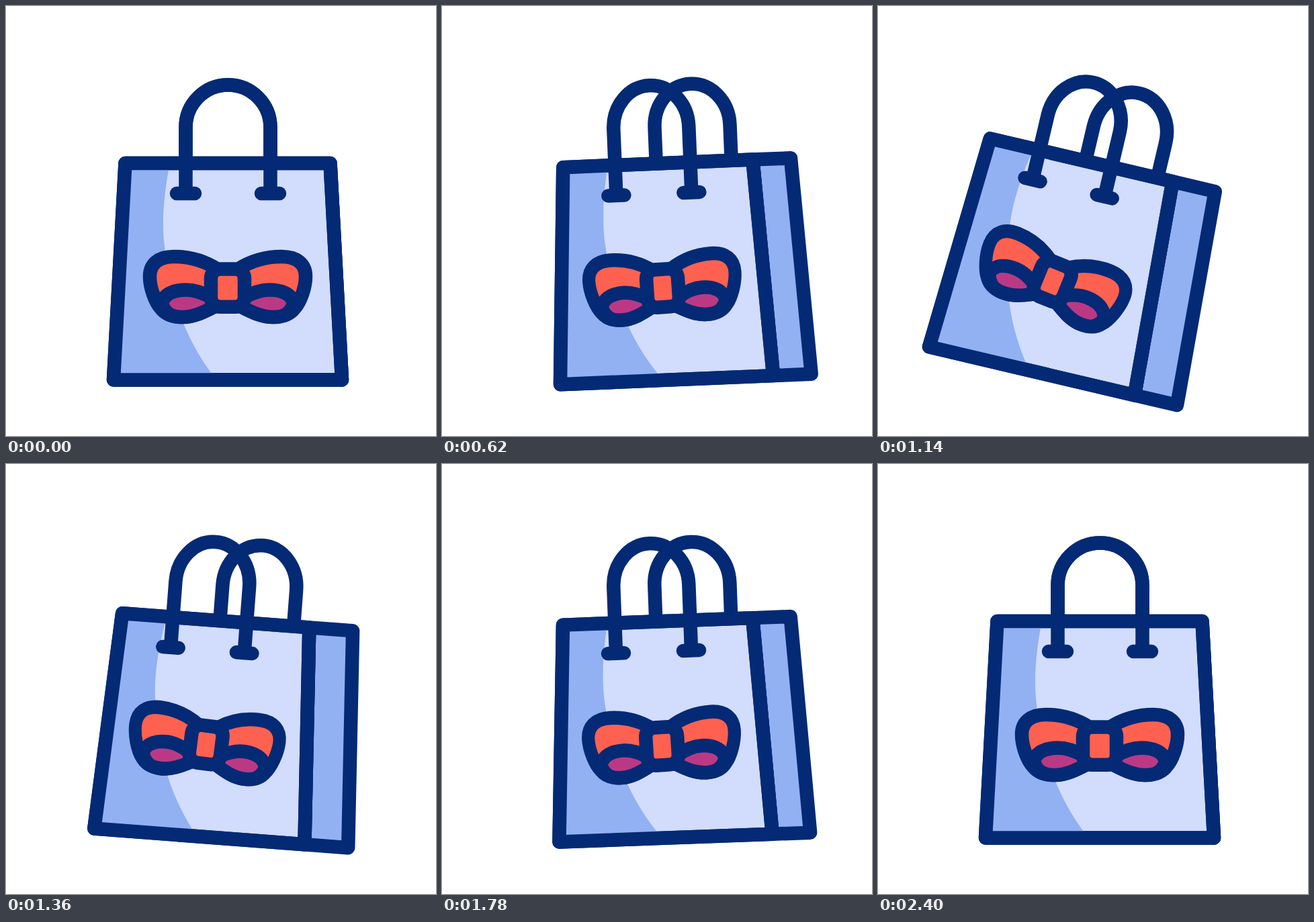
Animation of 640 by 640 pixels, one loop 2.42 s. Source, as an HTML page:

```html
<!DOCTYPE html>
<html lang="en">
<head>
<meta charset="utf-8">
<title>Swinging gift bag</title>
<style>
  html, body { margin: 0; width: 100%; height: 100%; overflow: hidden; background: #fff; }
  svg { display: block; width: 100%; height: 100%; }
  .line { fill: none; stroke: #042a75; stroke-width: 20.5; stroke-linecap: round; stroke-linejoin: round; }
  .line * { vector-effect: non-scaling-stroke; }
  .light { fill: #d2dcfd; }
  .shade { fill: #92b1f3; }
  .red { fill: #ff6150; }
  .purple { fill: #bb3984; }
</style>
</head>
<body>
<svg viewBox="0 0 640 640">
  <defs>
    <!-- One bow wing, relative to the knot centre -->
    <g id="wing">
      <path class="red" d="M-14-27C-34-40-58-46.500-80-46.500C-104-46.500-116-35-116-17C-116 0-108 21-100 30C-92 41-80 43.500-68 43.500C-50 43.500-35 36-18 27"/>
      <path class="purple" d="M-98 24C-96 8-78 3-62 3C-46 3-34 9-24 15L-18 27C-35 36-50 43.500-68 43.500C-80 43.500-92 41-98 24Z"/>
    </g>
  </defs>
  <g id="bag" class="line">
    <path id="backHandle" d="M-63 234V180.500A63 63 0 0 1 63 180.500V234"/>
    <path id="side" class="shade"/>
    <path id="front" class="light"/>
    <path class="shade" stroke="none" d="M177 234H244C236 272 231 320 236 357C243 430 268 500 313 556H160Z"/>
    <path id="frontEdge"/>
    <path id="frontHandle" d="M-76.500 279H-49.500M-63 279V180.500A63 63 0 0 1 63 180.500V279M49.500 279H76.500"/>
    <g id="bow">
      <use href="#wing"/>
      <use href="#wing" transform="scale(-1 1)"/>
      <rect class="red" x="-25" y="-28" width="50" height="56.300" rx="14"/>
    </g>
  </g>
</svg>
<script>
  const LOOP = 2420, STEP = 400;
  const SWING = [0, 1, -1, 1, -1, 1, 0, 0];
  const el = id => document.getElementById(id);
  const set = (id, name, value) => el(id).setAttribute(name, value);
  const clamp = x => Math.max(0, Math.min(1, x));
  const ease = x => x * x * (3 - 2 * x);

  function swingAt(t) {
    const i = Math.floor(t / STEP);
    return SWING[i] + (SWING[i + 1] - SWING[i]) * ease(t / STEP - i);
  }

  function render(t) {
    const swing = swingAt(t);
    const open = ease(clamp(Math.min(t, 2400 - t) / 800));
    const near = -26 * open, far = 39 * open;
    const front = `M177.500 234H${482.5 + near}L${500 + near} 556.500H160Z`;

    set('bag', 'transform', `rotate(${15 * swing} 330 170)`);
    set('front', 'd', front);
    set('frontEdge', 'd', front);
    set('side', 'd', `M${482.5 + near} 234H${482.5 + far}L${500 + far} 556.500H${500 + near}Z`);

    const squeeze = 1 - 0.127 * open;
    set('backHandle', 'transform', `translate(${330.5 + 47.7 * open}) scale(${squeeze} 1)`);
    set('frontHandle', 'transform', `translate(${330.5 - 22.5 * open}) scale(${squeeze} 1)`);
    set('bow', 'transform',
      `translate(${330 - 13.5 * open} 419.500) rotate(${10 * swing}) scale(${1 - 0.07 * open} 1)`);
  }

  function tick() {
    render(performance.now() % LOOP);
    requestAnimationFrame(tick);
  }
  tick();
</script>
</body>
</html>
```
